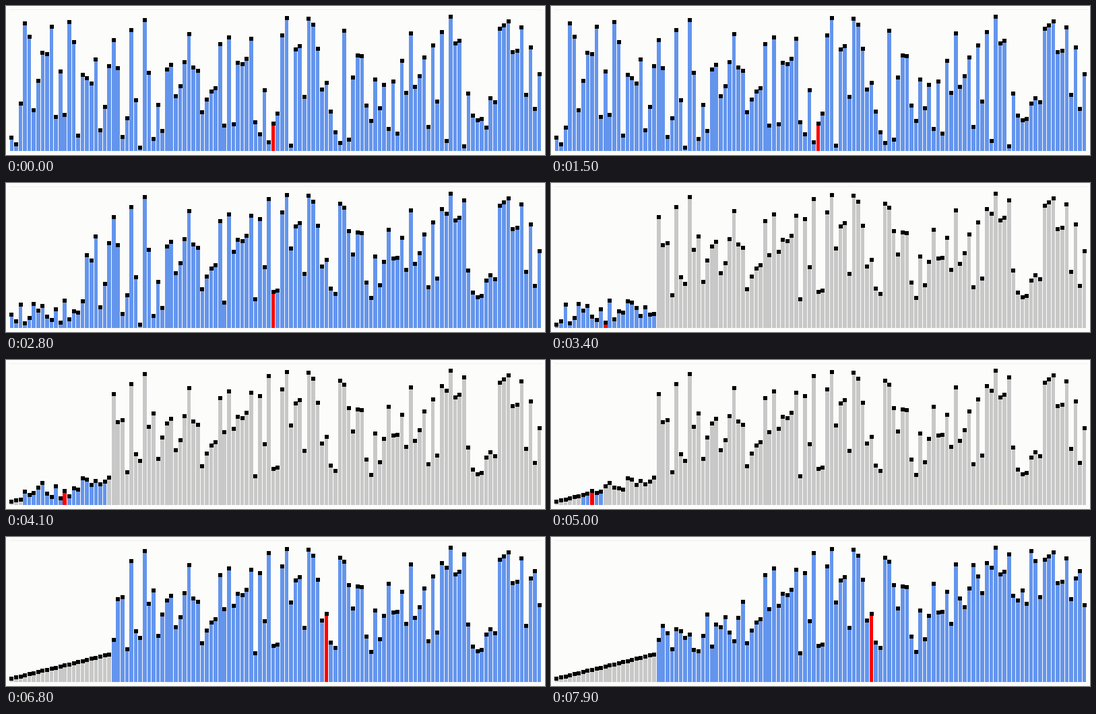
Write a matplotlib script that moves like this. It is 800x223 px and loops after 8 s.

```python
import numpy as np
import matplotlib.pyplot as plt
from matplotlib.animation import FuncAnimation
from matplotlib.collections import PolyCollection

WIDTH, HEIGHT, DPI = 800, 223, 100
FRAMES, INTERVAL, HOLD = 80, 100, 15
LEFT, PITCH, BASE = 5.1, 6.583, 217.2
MARKER = 6

PAPER, BLUE, GRAY, RED = "#fcfcfa", "#6495ed", "#c8c8c8", "#ff0000"

# Marker heights of the shuffled bars, only their order matters.
SHUFFLED = [
    197, 207, 146, 26, 45, 156, 111, 70, 72, 31, 166, 98, 162, 24, 54,
    194, 103, 108, 116, 80, 185, 151, 90, 50, 93, 195, 167, 36, 141, 212,
    21, 100, 198, 148, 187, 95, 88, 134, 120, 84, 42, 92, 97, 159, 139,
    128, 123, 57, 179, 47, 177, 85, 87, 78, 49, 174, 192, 126, 204, 176,
    161, 44, 17, 209, 65, 60, 136, 19, 27, 63, 125, 115, 157, 189, 205,
    37, 201, 106, 73, 75, 149, 172, 110, 153, 118, 184, 113, 190, 82, 129,
    41, 121, 105, 77, 181, 58, 143, 39, 202, 16, 55, 52, 210, 131, 164,
    171, 169, 182, 138, 144, 34, 29, 22, 68, 67, 32, 133, 62, 154, 101,
]
RANKS = np.argsort(np.argsort(-np.array(SHUFFLED)))
COUNT = len(RANKS)


def quicksort(a, lo, hi, announce=False):
    """Yield (bars, lo, hi) after every swap; return whether a right part was sorted."""
    if announce:
        yield a.copy(), lo, hi
    pivot = a[(lo + hi) // 2]
    i, j = lo, hi
    while i <= j:
        while a[i] < pivot:
            i += 1
        while a[j] > pivot:
            j -= 1
        if i <= j:
            a[i], a[j] = a[j], a[i]
            i, j = i + 1, j - 1
            yield a.copy(), lo, hi
    deep = False
    if lo < j:
        deep = yield from quicksort(a, lo, j)
    if i < hi:
        yield from quicksort(a, i, hi, deep)
    return i < hi


start = (RANKS.copy(), 0, COUNT - 1)
steps = [start] + list(quicksort(RANKS.copy(), 0, COUNT - 1))


def boxes(x, width, top, bottom):
    x0, y0, y1 = np.broadcast_arrays(x, top, bottom)
    x1 = x0 + width
    return np.stack([np.column_stack(p) for p in
                     ((x0, y0), (x1, y0), (x1, y1), (x0, y1))], axis=1)


fig = plt.figure(figsize=(WIDTH / DPI, HEIGHT / DPI), dpi=DPI, facecolor=PAPER)
ax = fig.add_axes([0, 0, 1, 1])
ax.set_xlim(0, WIDTH)
ax.set_ylim(HEIGHT, 0)
ax.axis("off")
ax.plot([5, 795], [4.5, 4.5], color="#f0f0ee", lw=0.72)

slots = LEFT + PITCH * np.arange(COUNT)
bars = PolyCollection([], linewidths=0)
markers = PolyCollection([], facecolors="black", linewidths=0)
ax.add_collection(bars, autolim=False)
ax.add_collection(markers, autolim=False)


def draw(frame):
    values, lo, hi = steps[min(max(frame - HOLD + 1, 0), len(steps) - 1)]
    top = 209 - 1.647 * values
    colors = [BLUE if lo <= k <= hi else GRAY for k in range(COUNT)]
    colors[(lo + hi) // 2] = RED
    bars.set_verts(boxes(slots + 0.4, 5.6, top + MARKER, BASE))
    bars.set_facecolor(colors)
    markers.set_verts(boxes(slots + 0.3, MARKER, top, top + MARKER))
    return bars, markers


anim = FuncAnimation(fig, draw, frames=FRAMES, interval=INTERVAL,
                     repeat=True, repeat_delay=0)
plt.show()
```
